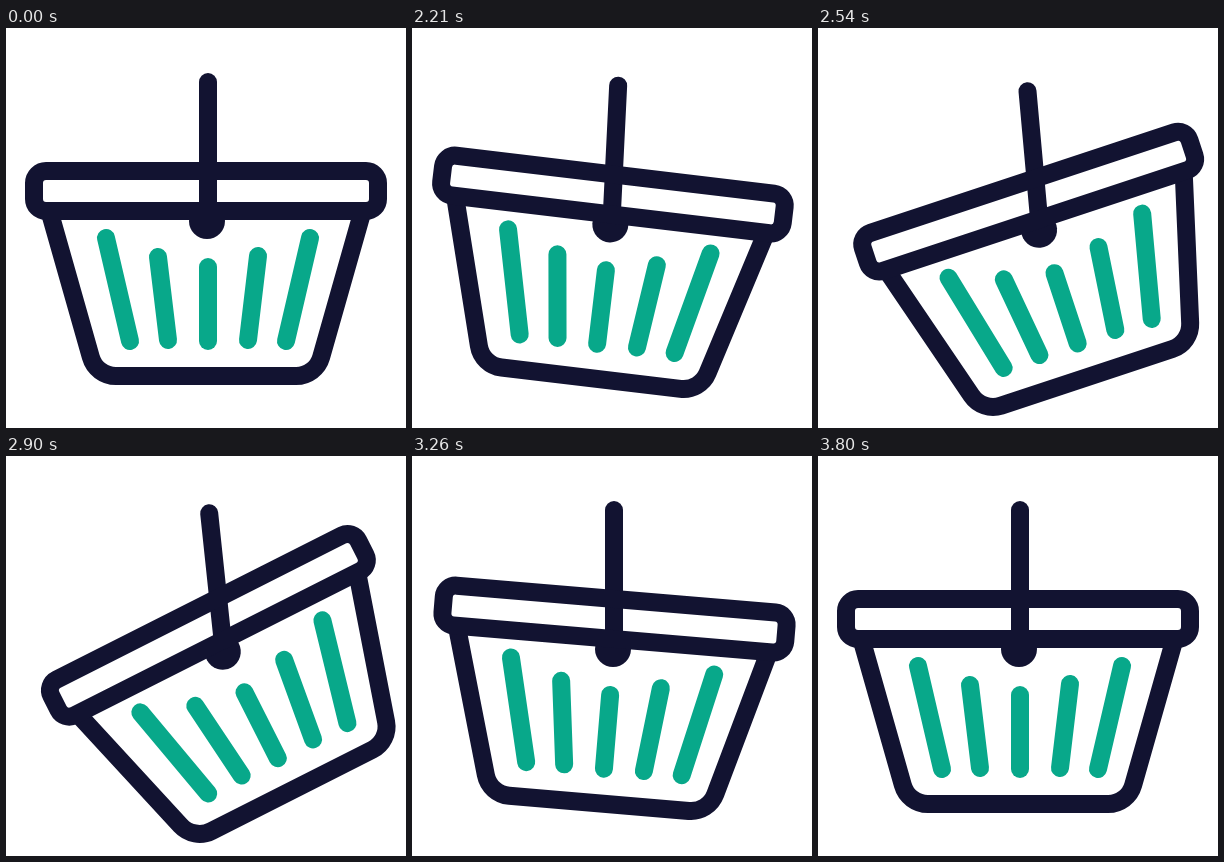
These frames come from a looping animation (400x400 px, 3830 ms). An HTML page with a canvas:

```html
<!DOCTYPE html>
<html lang="en">
<head>
<meta charset="utf-8">
<title>Swinging basket</title>
<style>
html, body { margin: 0; width: 100%; height: 100%; overflow: hidden; background: #fff; }
canvas { display: block; width: 100vw; height: 100vh; }
</style>
</head>
<body>
<canvas id="stage" width="400" height="400"></canvas>
<script>
const ctx = document.getElementById('stage').getContext('2d');
const LOOP = 3830, REST = 2000, STEP = 30;
const NAVY = '#121331', GREEN = '#08a88a';

// Tracks are [step, value] keys joined by smooth easing.
const SHIFT_X = [[0, 0], [14, 8.3], [35, 0]];
const SHIFT_Y = [[0, 0], [16.5, 9.4], [39, 0]];
const HANDLE = [[0, 0], [6, 3], [12.5, 0], [22.5, -9], [42, 0]];
const BASKET = [[0, 0], [9.5, 8.2], [24, -34], [48, 12], [60, 0]];

const STRIPES = [
  [100, 210, 124, 313],
  [152, 229, 162, 312],
  [202, 239, 202, 313],
  [252, 228, 242, 312],
  [304, 210, 280, 313]
];

function track(keys, n) {
  for (let i = 1; i < keys.length; i++) {
    const [n0, v0] = keys[i - 1], [n1, v1] = keys[i];
    if (n <= n1) {
      const s = (n - n0) / (n1 - n0);
      return v0 + (v1 - v0) * s * s * (3 - 2 * s);
    }
  }
  return keys[keys.length - 1][1];
}

const rad = deg => deg * Math.PI / 180;

function line(x0, y0, x1, y1, color) {
  ctx.strokeStyle = color;
  ctx.beginPath();
  ctx.moveTo(x0, y0);
  ctx.lineTo(x1, y1);
  ctx.stroke();
}

function roundBox(x, y, w, h, r) {
  ctx.beginPath();
  ctx.moveTo(x + r, y);
  ctx.arcTo(x + w, y, x + w, y + h, r);
  ctx.arcTo(x + w, y + h, x, y + h, r);
  ctx.arcTo(x, y + h, x, y, r);
  ctx.arcTo(x, y, x + w, y, r);
  ctx.closePath();
  ctx.stroke();
}

function drawBasket() {
  STRIPES.forEach(s => line(...s, GREEN));
  ctx.strokeStyle = NAVY;
  ctx.beginPath();
  ctx.moveTo(44.5, 187);
  ctx.arcTo(90.2, 348, 200, 348, 26);
  ctx.arcTo(309.8, 348, 355.5, 187, 26);
  ctx.lineTo(355.5, 187);
  ctx.stroke();
  roundBox(28, 143, 344, 40, 12);
}

function draw(n) {
  const tilt = track(HANDLE, n), swing = track(BASKET, n);
  ctx.setTransform(1, 0, 0, 1, 0, 0);
  ctx.fillStyle = '#fff';
  ctx.fillRect(0, 0, 400, 400);
  ctx.lineWidth = 18;
  ctx.lineCap = ctx.lineJoin = 'round';

  ctx.translate(202 + track(SHIFT_X, n), 54 + track(SHIFT_Y, n));
  ctx.rotate(rad(tilt));
  line(0, 0, 0, 136, NAVY);

  // The basket hangs from the knob at the foot of the handle.
  ctx.translate(-1, 139);
  ctx.fillStyle = NAVY;
  ctx.beginPath();
  ctx.arc(0, 0, 18, 0, Math.PI * 2);
  ctx.fill();
  ctx.rotate(rad(swing - tilt));
  ctx.translate(-201, -193);
  drawBasket();
}

let start = null;
function tick(now) {
  if (start === null) start = now;
  const t = (now - start) % LOOP;
  draw(Math.min(60, Math.max(0, Math.floor((t - REST) / STEP))));
  requestAnimationFrame(tick);
}
draw(0);
requestAnimationFrame(tick);
</script>
</body>
</html>
```
